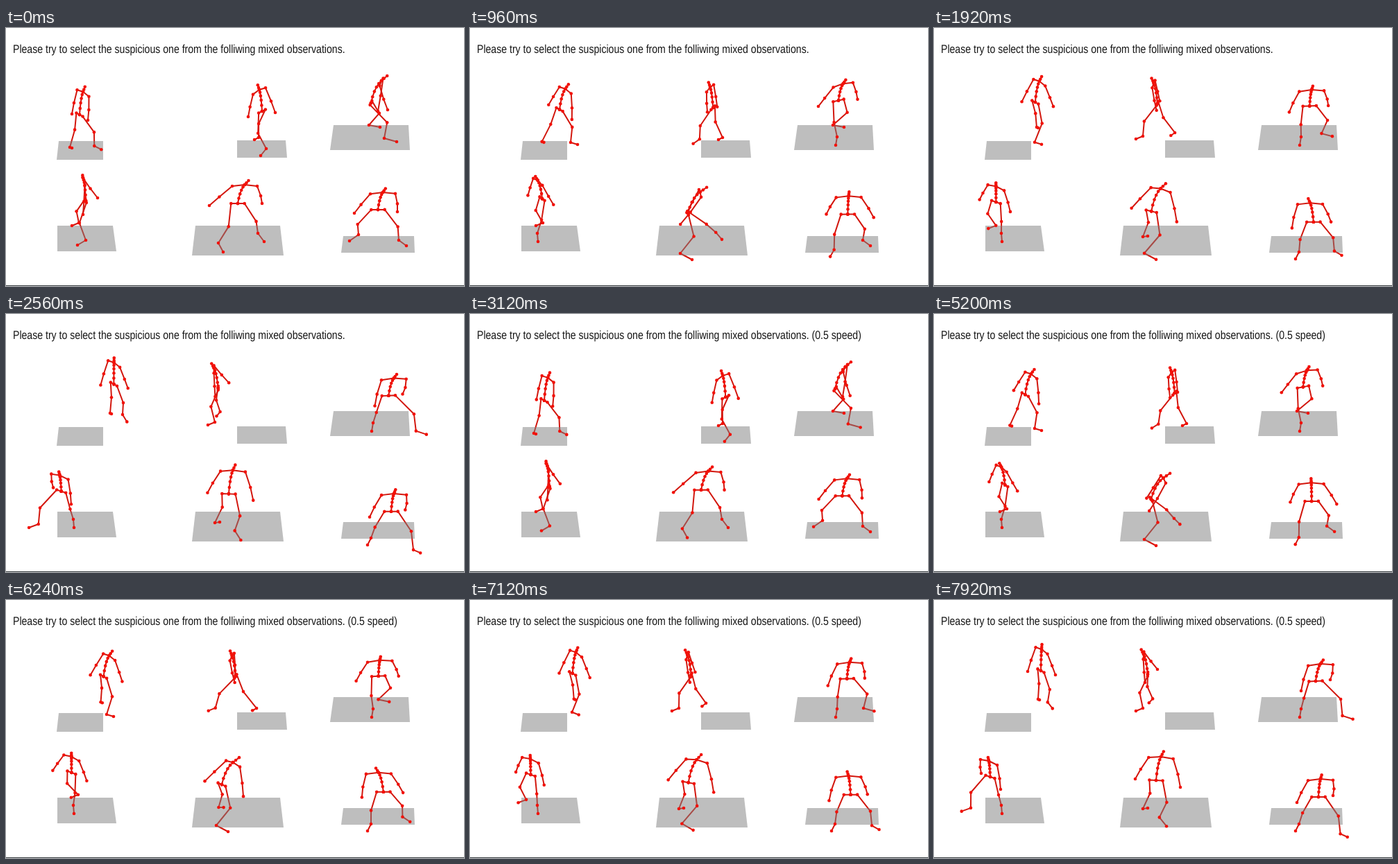
An HTML page with a canvas for the animation above (8 s loop, 660x372 px).

```html
<!DOCTYPE html>
<html lang="en">
<head>
<meta charset="utf-8">
<title>Mixed observations</title>
<style>
  html, body { margin: 0; width: 100%; height: 100%; overflow: hidden; background: #fff; }
  #stage { position: relative; width: 660px; height: 372px; overflow: hidden; }
  canvas { position: absolute; left: 0; top: 0; width: 660px; height: 372px; }
  p {
    position: absolute; left: 10px; top: 22px; margin: 0; white-space: pre;
    font: 14.1px/16px "Liberation Sans", Arial, sans-serif; color: #161616;
    text-rendering: geometricPrecision;
    transform: scaleY(1.2); transform-origin: 0 50%;
  }
  #rule { position: absolute; left: 0; bottom: 0; width: 660px; height: 1px; background: #3a3f42; }
</style>
</head>
<body>
<div id="stage">
  <canvas id="view"></canvas>
  <p>Please try to select the suspicious one from the folliwing mixed observations.<span id="note"> (0.5 speed)</span></p>
  <div id="rule"></div>
</div>
<script>
const LOOP = 8000, STEP = 80, SLOW_AT = 3040;
const KEY_GAP = 813;                   // ms between the keys of a path
const SHOULDER = 18, HIP = 0.54, TILT = 0.3, LIFT = 3;

const add = (a, b, k = 1) => a.map((v, i) => v + b[i] * k);
const mix = (a, b, u) => a.map((v, i) => v + (b[i] - v) * u);
const clamp = v => Math.min(1, Math.max(0, v));
const smooth = u => u * u * (3 - 2 * u);

// A smooth curve through evenly timed keys, drifting on past the last one.
const path = (...keys) => time => {
  const end = keys.length - 1, u = time / KEY_GAP;
  if (end === 0) return keys[0];
  if (u >= end) return mix(keys[end - 1], keys[end], 1 + (u - end) * 0.7);
  const i = Math.floor(u), f = u - i, a = keys[i], b = keys[i + 1];
  const before = keys[i - 1] || mix(b, a, 2), after = keys[i + 2] || mix(a, b, 2);
  return a.map((v, c) => {
    const m = (b[c] - before[c]) / 2, n = (after[c] - v) / 2;
    return v + (b[c] - v) * smooth(f) + f * (1 - f) * (m * (1 - f) - n * f);
  });
};
const turn = (...angles) => path(...angles.map(a => [a * Math.PI / 180]));

// A foot [ankle x, y, toe x, y] rests until a step lifts it to its next place.
const foot = (rest, ...steps) => time => steps.reduce((pos, { from, to, place }) => {
  const u = clamp((time - from) / (to - from)), rise = LIFT * Math.sin(Math.PI * u);
  return add(mix(pos, place, smooth(u)), [0, -rise, 0, -rise]);
}, rest);
const step = (from, to, ...place) => ({ from, to, place });

// Hands are measured from the neck.
const walkers = [
  {
    plate: [[76, 163], [140, 163], [140, 190], [73, 190]],
    neck: path([111, 92], [134, 89], [149, 80], [155, 71]),
    pelvis: path([106, 125], [126, 119], [141, 110], [154, 102]),
    facing: turn(-62),
    handL: path([-16, 32], [-23, 23], [-27, 28], [-20, 32]),
    handR: path([7, 41], [8, 45], [19, 37], [20, 37]),
    footL: foot([92, 172, 95, 173], step(500, 2100, 150, 143, 152, 144)),
    footR: foot([120, 176, 130, 182], step(-250, 450, 145, 165, 155, 168),
      step(1900, 2700, 170, 145, 176, 156))
  },
  {
    plate: [[333, 162], [403, 162], [405, 187], [333, 187]],
    neck: path([365, 89], [350, 86], [325, 80], [302, 78]),
    pelvis: path([369, 120], [354, 116], [330, 110], [308, 107]),
    facing: turn(60, 72),
    handL: path([-16, 39], [-6, 36], [4, 39], [2, 41]),
    handR: path([23, 33], [12, 29], [5, 28], [20, 22]),
    footL: foot([375, 174, 367, 184], step(0, 1700, 301, 156, 291, 160)),
    footR: foot([364, 158, 358, 161], step(1400, 3000, 296, 140, 291, 147))
  },
  {
    plate: [[472, 140], [580, 140], [582, 176], [467, 176]],
    neck: path([541, 76], [538, 79], [539, 87], [557, 92]),
    pelvis: path([526, 108], [530, 104], [537, 110], [550, 117]),
    facing: turn(82, 45, 10, 8),
    handL: path([9, 42], [-33, 34], [-34, 30], [-28, 39]),
    handR: path([-5, 44], [18, 24], [27, 23], [14, 23]),
    footL: foot([545, 159, 563, 164], step(0, 700, 529, 157, 527, 169)),
    footR: foot([523, 140, 539, 143], step(1200, 2600, 591, 169, 606, 174))
  },
  {
    plate: [[74, 285], [154, 285], [159, 322], [74, 322]],
    neck: path([112, 219], [99, 219], [94, 226], [79, 232]),
    pelvis: path([115, 249], [106, 246], [94, 249], [81, 255]),
    facing: turn(-85, -72, -52, -48),
    handL: path([20, 26], [-10, 22], [-27, 20], [-11, 18]),
    handR: path([-1, 50], [21, 36], [22, 35], [17, 41]),
    footL: foot([105, 281, 95, 285], step(1500, 2800, 41, 307, 27, 312)),
    footR: foot([115, 306, 103, 313], step(0, 900, 97, 296, 98, 308))
  },
  {
    plate: [[273, 285], [395, 285], [400, 328], [268, 328]],
    neck: path([344, 226], [333, 236], [327, 234], [327, 226]),
    pelvis: path([334, 253], [316, 266], [311, 266], [320, 260]),
    facing: turn(0, 85, 125, 170),
    handL: path([-51, 30], [-36, 45], [16, 49], [28, 44]),
    handR: path([25, 27], [-13, 30], [-41, 27], [-37, 32]),
    footL: foot([306, 310, 313, 323], step(0, 500, 303, 325, 320, 334),
      step(1900, 2700, 332, 313, 340, 327)),
    footR: foot([363, 296, 372, 308], step(700, 1800, 301, 301, 308, 300))
  },
  {
    plate: [[486, 300], [588, 300], [589, 324], [483, 324]],
    neck: path([543, 237], [547, 241], [537, 249], [557, 258]),
    pelvis: path([536, 262], [544, 267], [544, 277], [554, 284]),
    facing: turn(2),
    handL: path([-41, 30], [-34, 25], [-24, 36], [-34, 34]),
    handR: path([21, 28], [35, 31], [35, 29], [18, 24]),
    footL: foot([508, 298, 495, 307], step(0, 1150, 526, 323, 521, 333)),
    footR: foot([566, 306, 577, 314], step(1000, 2900, 589, 345, 599, 349))
  }
];

// The neck carries on into the head, and the back bends to follow it.
function spine(neck, pelvis) {
  const head = [neck[0] + (neck[0] - pelvis[0]) * 0.55, neck[1] + (neck[1] - pelvis[1]) * 0.22];
  const bend = mix(head, neck, 2.2), points = [head, mix(head, neck, 0.55)];
  for (let u = 0; u <= 1; u += 0.2) {
    points.push(mix(mix(neck, bend, u), mix(bend, pelvis, u), u));
  }
  return [...points, pelvis];
}

function arm(neck, side, offset) {
  const shoulder = add(add(neck, [0, 2]), side), hand = add(neck, offset);
  const elbow = add(add(mix(shoulder, hand, 0.52), side, 0.08), [0, 1]);
  return [neck, shoulder, elbow, hand];
}

// The knee points the way the foot does.
function leg(pelvis, side, [ax, ay, tx, ty]) {
  const hip = add(pelvis, side, HIP), ankle = [ax, ay];
  const knee = add(mix(hip, ankle, 0.5), [(tx - ax) * 0.8, (ty - ay) * 0.45 - 1]);
  return [pelvis, hip, knee, ankle, [tx, ty]];
}

function skeleton(w, time) {
  const neck = w.neck(time), pelvis = w.pelvis(time), [angle] = w.facing(time);
  const right = [SHOULDER * Math.cos(angle), -SHOULDER * TILT * Math.sin(angle)];
  const left = right.map(v => -v);
  return [
    spine(neck, pelvis),
    arm(neck, left, w.handL(time)), arm(neck, right, w.handR(time)),
    leg(pelvis, left, w.footL(time)), leg(pelvis, right, w.footR(time))
  ];
}

const view = document.getElementById("view"), note = document.getElementById("note");
const ctx = view.getContext("2d"), ratio = window.devicePixelRatio || 1;
view.width = 660 * ratio;
view.height = 372 * ratio;
ctx.scale(ratio, ratio);
ctx.lineJoin = ctx.lineCap = "round";

function trace(points) {
  ctx.beginPath();
  points.forEach(([x, y]) => ctx.lineTo(x, y));
}

function drawWalker(w, time) {
  const limbs = skeleton(w, time);
  ctx.strokeStyle = "#d2170e";
  ctx.lineWidth = 2;
  limbs.forEach(l => { trace(l); ctx.stroke(); });

  ctx.fillStyle = "rgba(126,126,126,.5)";
  trace(w.plate);
  ctx.fill();

  ctx.fillStyle = "#f21108";
  limbs.flat().forEach(([x, y]) => {
    ctx.beginPath();
    ctx.arc(x, y, 2.3, 0, 7);
    ctx.fill();
  });
}

function draw(now) {
  const t = Math.floor(now % LOOP / STEP) * STEP, slow = t >= SLOW_AT;
  ctx.clearRect(0, 0, 660, 372);
  walkers.forEach(w => drawWalker(w, slow ? (t - SLOW_AT) / 2 : t));
  note.style.visibility = slow ? "visible" : "hidden";
}

const start = performance.now();
function tick() {
  draw(performance.now() - start);
  requestAnimationFrame(tick);
}
tick();
</script>
</body>
</html>
```
